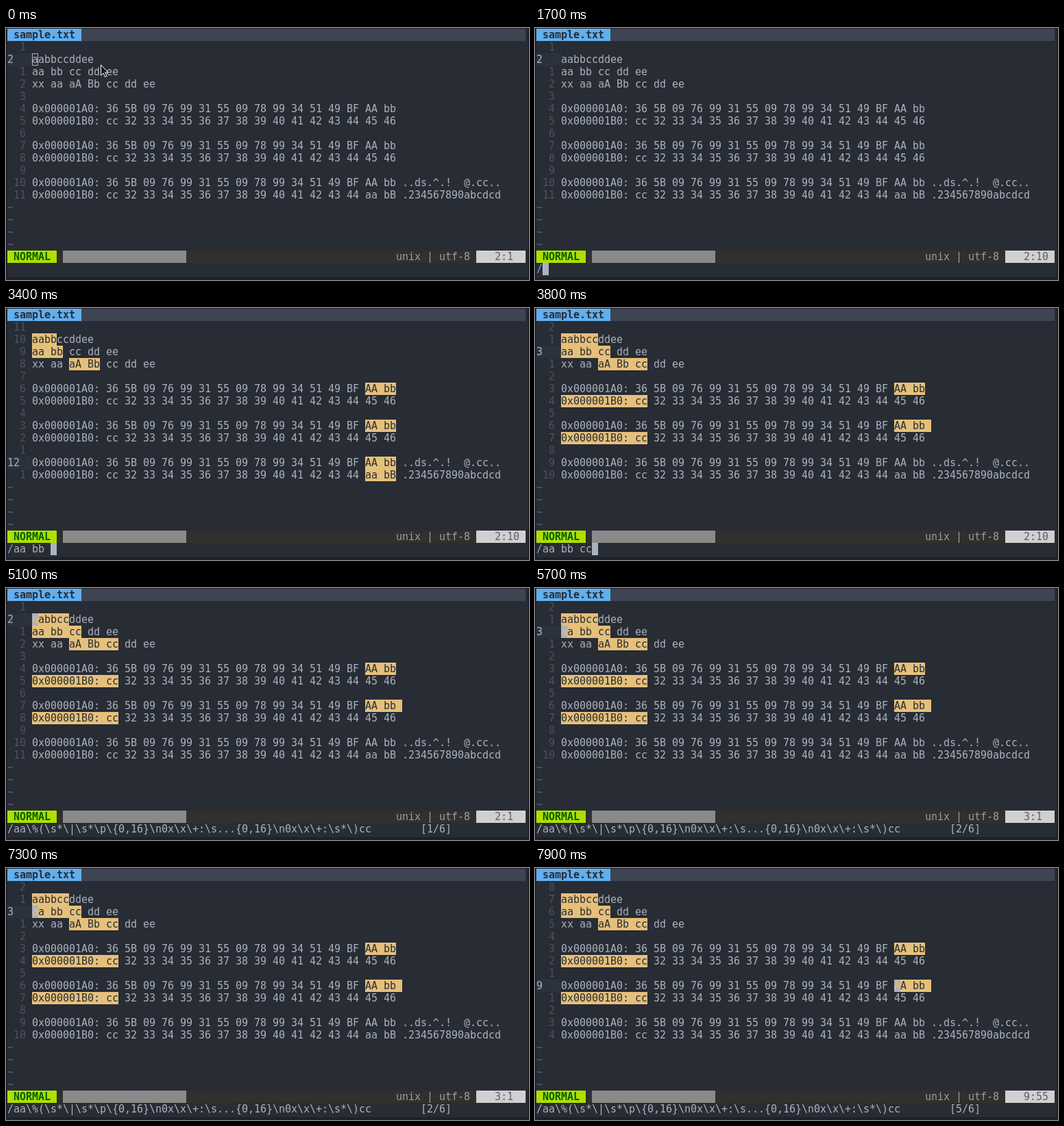
An HTML page that plays this animation: 763 by 368 pixels, repeating every 8000 ms.

```html
<!DOCTYPE html>
<html lang="en">
<head>
<meta charset="utf-8">
<title>Editor search</title>
<style>
  html, body { margin: 0; width: 100%; height: 100%; overflow: hidden; background: #20212b; }
  svg { display: block; width: 763px; height: 368px; }
  text { font: 15px "DejaVu Sans Mono", monospace; white-space: pre; }
  .bold { font-weight: bold; }
</style>
</head>
<body>
<svg id="screen" viewBox="0 0 763 368" xmlns="http://www.w3.org/2000/svg"></svg>
<script>
const LOOP = 8000;
const CELL_W = 9, CELL_H = 18, LEFT = 2, TOP = 1, COLS = 84, GUTTER = 4;
const STATUS_ROW = 18, CMD_ROW = 19;
const C = {
  bg: "#282c34", fg: "#abb2bf", dim: "#4b5263", tilde: "#5c6370", gutter: "#2c323c",
  tabs: "#3e4452", blue: "#61afef", hit: "#e5c07b",
  bar: "#30302e", mode: "#afdf00", modeText: "#005f00", block: "#8a8a8a",
  info: "#9e9e9e", pos: "#d0d0d0", posText: "#606060"
};

const hexA = "0x000001A0: 36 5B 09 76 99 31 55 09 78 99 34 51 49 BF AA bb";
const hexB = "0x000001B0: cc 32 33 34 35 36 37 38 39 40 41 42 43 44 ";
const LINES = [
  "", "aabbccddee", "aa bb cc dd ee", "xx aa aA Bb cc dd ee",
  "", hexA, hexB + "45 46",
  "", hexA + " ", hexB + "45 46",
  "", hexA + " ..ds.^.!  @.cc..", hexB + "aa bB .234567890abcdcd"
];
const BUFFER = LINES.join("\n");

const QUERY = "aa bb cc";
const GAP = "(?: *|[ -~]{0,16}\\n0x[0-9A-F]+: *)";
const ECHO = String.raw`/aa\%(\s*\|\s*\p\{0,16}\n0x\x\+:\s...{0,16}\n0x\x\+:\s*\)cc`;
const WRAPPED = "search hit BOTTOM, continuing at TOP";

// Start of each full match: line, column
const MATCHES = [[2, 1], [3, 1], [4, 7], [6, 55], [9, 55], [12, 55]];

const CLICK = 700, PROMPT = 1700, ENTER = 5100;
const KEYS = [2000, 2100, 2600, 2800, 3000, 3400, 3600, 3800];
const PREVIEWS = KEYS.filter(k => k !== 2600);
const NEXTS = [5700, 6000, 6200, 6500, 6700, 7000, 7300, 7500, 7700, 7900];
const WRAP_STEP = MATCHES.length;

// Pointer stops: time, x, y
const POINTER = [[0, 138, 53], [100, 157, 73], [300, 172, 72], [400, 184, 62],
                 [500, 193, 51], [600, 196, 45]];

const passed = (times, t) => times.filter(k => k <= t).length;
const px = col => LEFT + col * CELL_W;
const py = row => TOP + row * CELL_H;

function rect(x, y, w, h, fill) {
  return `<rect x="${x}" y="${y}" width="${w}" height="${h}" fill="${fill}"/>`;
}

function cells(col, row, n, fill) {
  return rect(px(col), py(row), n * CELL_W, CELL_H, fill);
}

// Text on the character grid
function put(col, row, str, fill, cls = "") {
  if (!str.trim()) return "";
  const xs = [...str].map((_, i) => px(col + i)).join(" ");
  const body = str.replace(/ /g, "\u00a0");
  return `<text class="${cls}" x="${xs}" y="${py(row) + 14}" fill="${fill}">${body}</text>`;
}

// One flag per buffer character: is it inside a match?
function findHits(query) {
  const flags = new Array(BUFFER.length).fill(false);
  const words = query.split(" ").filter(Boolean);
  if (!words.length) return flags;
  for (const m of BUFFER.matchAll(new RegExp(words.join(GAP), "gi")))
    flags.fill(true, m.index, m.index + m[0].length);
  return flags;
}

function drawLine(str, row, flags) {
  let out = "";
  for (let i = 0; i < str.length;) {
    let j = i + 1;
    while (j < str.length && flags[j] === flags[i]) j++;
    if (flags[i]) out += cells(GUTTER + i, row, j - i, C.hit);
    out += put(GUTTER + i, row, str.slice(i, j), flags[i] ? C.bg : C.fg);
    i = j;
  }
  return out;
}

function drawNumber(n, current) {
  if (n === current)
    return cells(0, n, GUTTER, C.gutter) + put(0, n, String(n), C.fg);
  return put(0, n, String(Math.abs(n - current)).padStart(3), C.dim);
}

function drawBuffer(s) {
  const flags = findHits(s.query);
  let out = "", start = 0;
  LINES.forEach((str, i) => {
    const own = flags.slice(start, start + str.length);
    out += drawNumber(i + 1, s.line) + drawLine(str, i + 1, own);
    if (s.cursor === "solid" && i + 1 === s.line) {
      const c = s.col - 1;
      out += cells(GUTTER + c, s.line, 1, C.fg) +
             put(GUTTER + c, s.line, str[c], own[c] ? C.hit : C.bg);
    }
    start += str.length + 1;
  });
  for (let r = LINES.length + 1; r < STATUS_ROW; r++) out += put(0, r, "~", C.tilde);
  if (s.cursor === "hollow")
    out += `<rect x="${px(GUTTER + s.col - 1) + .5}" y="${py(s.line) + .5}" width="8" height="17"
      fill="none" stroke="${C.fg}"/>`;
  return out;
}

function drawBars(s) {
  const place = ` ${String(s.posLine).padStart(3)}:${s.posCol}`;
  return cells(0, 0, COLS, C.tabs) + cells(0, 0, 12, C.blue) +
    put(1, 0, "sample.txt", C.bg, "bold") +
    cells(0, STATUS_ROW, COLS, C.bar) + cells(0, STATUS_ROW, 8, C.mode) +
    put(1, STATUS_ROW, "NORMAL", C.modeText, "bold") +
    cells(9, STATUS_ROW, 20, C.block) +
    put(63, STATUS_ROW, "unix | utf-8", C.info) +
    cells(76, STATUS_ROW, 8, C.pos) + put(76, STATUS_ROW, place, C.posText);
}

function drawCommand(s) {
  if (s.message) return put(0, CMD_ROW, s.message, s.warn ? C.hit : C.fg);
  if (s.cursor !== "prompt") return "";
  return put(0, CMD_ROW, "/", C.blue) + put(1, CMD_ROW, s.query, C.fg) +
    cells(1 + s.query.length, CMD_ROW, 1, C.fg);
}

function drawPointer(p) {
  if (!p) return "";
  return `<path transform="translate(${p[1]} ${p[2]})" fill="#15171c" stroke="#fff"
    d="M.5 .8V16.2L4.1 12.9L6.5 18.5L9 17.4L6.6 11.9H11Z"/>`;
}

function stateAt(t) {
  const s = { line: 2, col: 1, posLine: 2, posCol: 1, query: "", cursor: "hollow",
              message: "", warn: false, pointer: null };
  if (t < PROMPT) {
    s.pointer = POINTER[passed(POINTER.map(p => p[0]), t) - 1];
    if (t >= CLICK) {
      s.cursor = "solid";
      s.col = s.posCol = 10;
    }
  } else if (t < ENTER) {
    s.cursor = "prompt";
    s.posCol = 10;
    s.query = QUERY.slice(0, passed(KEYS, t));
    s.line = MATCHES[passed(PREVIEWS, t) % MATCHES.length][0];
  } else {
    const step = passed(NEXTS, t), index = step % MATCHES.length;
    [s.line, s.col] = [s.posLine, s.posCol] = MATCHES[index];
    s.cursor = "solid";
    s.query = QUERY;
    s.warn = step === WRAP_STEP;
    s.message = s.warn ? WRAPPED : ECHO.padEnd(67) + `[${index + 1}/${MATCHES.length}]`;
  }
  return s;
}

const screenEl = document.getElementById("screen");
let shown = "";

function render(t) {
  const s = stateAt(t), key = JSON.stringify(s);
  if (key === shown) return;
  shown = key;
  screenEl.innerHTML = rect(0, 0, 763, 368, "#20212b") + rect(2, 1, 759, 363, C.bg) +
    drawBars(s) + drawBuffer(s) + drawCommand(s) + drawPointer(s.pointer);
}

const began = performance.now();
function tick() {
  render((performance.now() - began) % LOOP);
  requestAnimationFrame(tick);
}
tick();
</script>
</body>
</html>
```
